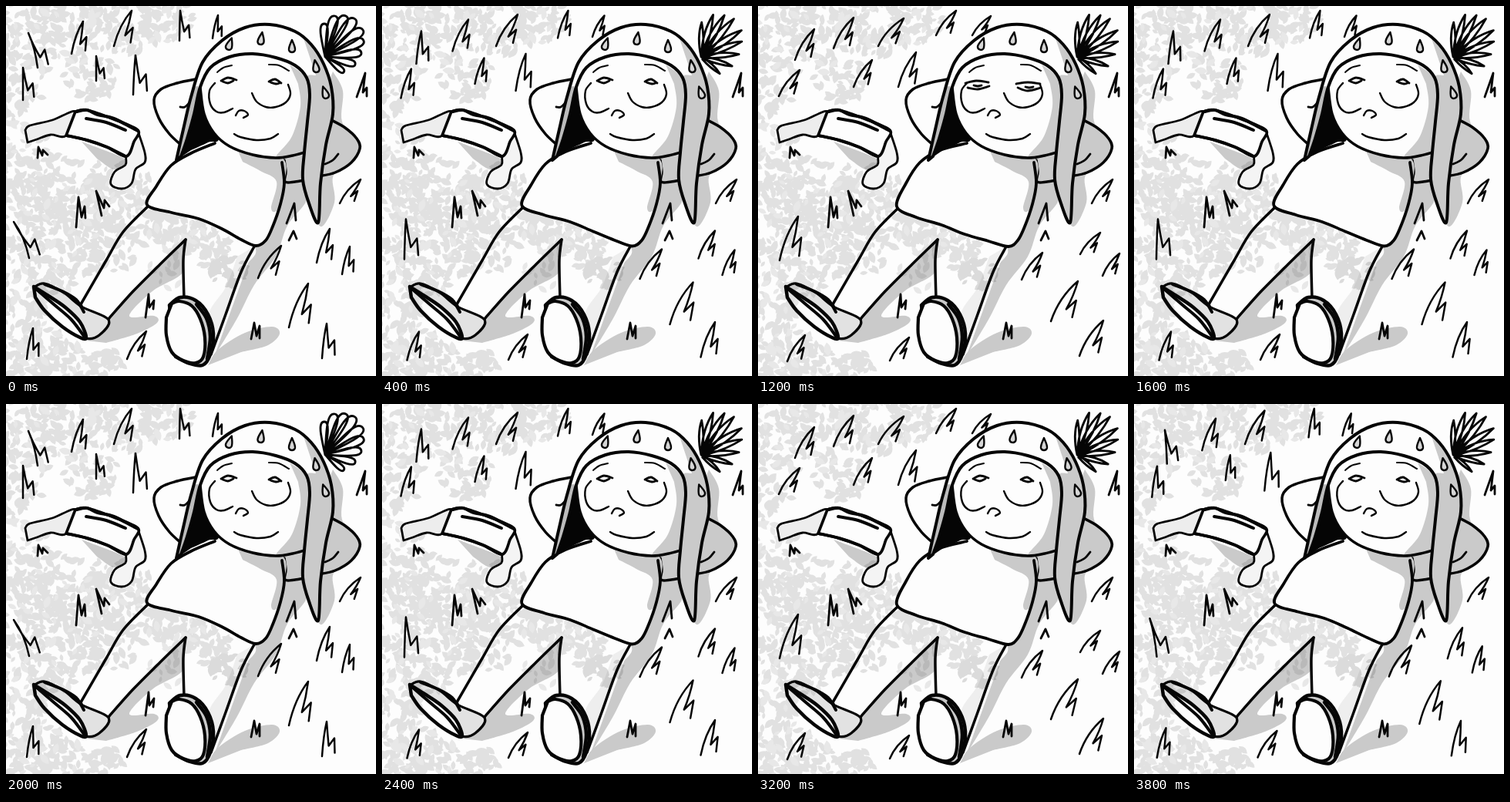
Recreate the animation shown at these times as an HTML page. Size 480 px wide and 480 px high, loop 4 s.

```html
<!DOCTYPE html>
<html lang="en">
<head>
<meta charset="utf-8">
<title>Resting on the grass</title>
<style>
html, body { margin: 0; width: 100%; height: 100%; overflow: hidden; background: #fdfdfd; }
svg { display: block; width: 100%; height: 100%; }
path { stroke-linecap: round; stroke-linejoin: round; }
#leaves { mix-blend-mode: multiply; }
</style>
</head>
<body>
<svg id="stage" viewBox="0 0 480 480"></svg>
<script>
const stage = document.getElementById('stage');
const INK = '#050505', PAPER = '#fdfdfd', SHADE = '#cacaca';

const points = text => text.split(' ').map(p => p.split(',').map(Number));
const mix = (a, b, k) => a + (b - a) * k;
const fix = n => n.toFixed(1);

// Smooth curve through the points; "close" joins the ends with a line.
function curve(list, close) {
  const p = typeof list === 'string' ? points(list) : list;
  let d = 'M' + p[0];
  for (let i = 0; i < p.length - 1; i++) {
    const a = p[i - 1] || p[i], b = p[i], c = p[i + 1], e = p[i + 2] || c;
    d += `C${fix(b[0] + (c[0] - a[0]) / 6)} ${fix(b[1] + (c[1] - a[1]) / 6)} ` +
         `${fix(c[0] - (e[0] - b[0]) / 6)} ${fix(c[1] - (e[1] - b[1]) / 6)} ${c}`;
  }
  return d + (close ? 'Z' : '');
}

function add(d, fill = 'none', width = 0, parent = stage) {
  const el = document.createElementNS('http://www.w3.org/2000/svg', 'path');
  el.setAttribute('d', d);
  el.setAttribute('fill', fill);
  if (width) {
    el.setAttribute('stroke', INK);
    el.setAttribute('stroke-width', width);
  }
  parent.appendChild(el);
  return el;
}
const line = (text, width = 3.5) => add(curve(text), 'none', width);
const area = (text, fill = SHADE, width = 0) => add(curve(text, true), fill, width);

let seed = 11;
const random = () => (seed = (seed * 16807) % 2147483647) / 2147483647;

function leaf(x, y) {
  const a = random() * Math.PI, l = 4 + random() * 5, w = l * 0.6;
  const dx = Math.cos(a), dy = Math.sin(a);
  const at = (u, v) => fix(x + u * dx - v * dy) + ' ' + fix(y + u * dy + v * dx);
  return `M${at(-l, 0)}Q${at(0, -w * 1.7)} ${at(l, 0)}Q${at(0, w * 1.7)} ${at(-l, 0)}`;
}

function foliage(text, density) {
  return text.split(' ').map(item => {
    const [x, y, r] = item.split(',').map(Number);
    let d = '';
    for (let i = 0; i < r * density; i++) {
      const a = random() * 2 * Math.PI, q = r * Math.sqrt(random());
      d += leaf(x + q * Math.cos(a) * 1.15, y + q * Math.sin(a));
    }
    return d;
  }).join('');
}

// Ground shadows
area('424,85 437,110 436,150 456,180 440,206 424,222 426,255 408,286 395,240 400,150');
area('322,312 345,290 362,232 386,228 390,252 365,285 350,325 322,362 300,405 270,455');
area('262,466 275,446 310,424 345,416 355,425 340,440 305,449');
area('104,434 133,406 175,360 229,312 230,345 190,370 160,402 192,402 196,411 170,425 130,437');
area('98,176 150,196 156,205 140,212 118,198');

// Arms
area('246,95 222,100 201,108 192,122 198,145 212,166 228,181 240,150', PAPER);
line('246,95 222,100 201,108 192,122 198,145 212,166 228,181');
line('239,124 232,131 226,131', 2.8);
area('420,147 440,158 455,172 459,185 448,203 427,216 405,221 362,228 358,195 400,170');
line('420,147 440,158 455,172 459,185 448,203 427,216 405,221');
line('361,200 363,215 362,228 375,228 387,226');
line('414,205 424,200 431,192', 2.8);

// Legs and shoes
area('184,260 150,295 130,330 97,387 105,398 133,406 165,370 200,335 233,303 229,340 231,382 262,400 268,440 285,400 305,345 322,312 250,270', PAPER);
area('233,304 229,318 198,340 168,369 190,343');
area('322,312 305,345 285,400 268,445 263,400 285,365 300,325', '#eeeeee');
line('184,260 152,293 130,330 97,387');
line('97,387 105,399 133,406');
line('133,406 165,370 200,335 233,303');
line('233,303 230,330 231,380');
line('322,312 305,345 285,400 266,452');
area('36,365 50,360 75,372 98,390 133,407 121,427 103,431 75,416 50,393', '#e2e2e2', 3.2);
area('36,364 55,376 77,391 96,410 104,430 96,430 73,416 50,395 38,378', PAPER, 4.5);
line('40,368 62,387 84,406 101,428', 4);
line('50,361 73,370 91,381 101,397', 4);
area('212,388 226,378 246,382 262,400 269,425 265,452 255,466 236,463 220,455', SHADE, 4.5);
area('215,386 225,383 241,389 252,406 258,430 256,455 246,463 230,460 215,449 208,427 208,404', PAPER, 4.2);
line('247,387 260,405 265,429 261,458', 4.5);

// Leaf shadows
const leaves = document.createElementNS('http://www.w3.org/2000/svg', 'g');
leaves.id = 'leaves';
stage.appendChild(leaves);
add(foliage('30,15,55 95,15,45 150,20,45 205,15,34 110,90,32 20,60,40 12,120,30 20,205,46 70,235,46 30,275,48 105,270,44 145,235,38 180,275,36 135,312,34 75,325,42 20,345,46 15,410,38 25,465,36 70,460,36 130,465,20 225,290,32 262,315,26', 1.7), '#e3e3e3', 0, leaves);
add(foliage('55,35,60 180,22,40 15,170,25 60,270,60 150,270,48 30,360,45 50,455,45 225,305,32 205,345,24', 0.45), '#eaeaea', 0, leaves);
add(foliage('288,345,20', 1.5), '#dddddd', 0, leaves);

// Bag
area('25,161 31,155 60,148 90,137 78,168 58,167 40,173 28,177', '#ededed', 2.8);
area('172,165 180,190 180,203 168,212 163,230 150,237 136,231 141,215 155,206 156,195 162,175', '#f4f4f4', 2.8);
area('90,137 105,135 140,147 171,161 166,176 156,195 131,183 105,174 78,168', PAPER, 3.6);
line('91,137 105,135 119,141 140,146 171,162', 4.2);
line('79,168 105,174 131,183 155,195', 4);
line('104,146 130,151 155,161', 4);

// Shirt
const SHIRT_IN = points('271,178 240,191 214,207 195,234 183,258 215,268 250,276 280,289 305,303 324,311');
const SHIRT_OUT = points('271,178 236,187 210,203 192,230 180,260 205,274 238,284 268,296 299,305 325,312');
const SHIRT_SIDE = points('337,304 346,286 356,257 361,230 358,203');
const shirtFill = add('', PAPER);
area('300,186 358,197 361,230 352,264 344,262 351,228 330,214 307,202');
const shirtLine = add('', 'none', 3.8);

// Hat tassel, then the head over it
const tassel = add('', PAPER, 2.8);
area('221,200 228,175 236,135 251,98 276,168 262,177 240,187', INK);
const HAT = '221,200 230,160 240,118 255,73 280,45 310,28 342,24 375,33 396,50 412,75 422,105 424,140 415,180 408,230 405,281 393,256 385,225 387,190 391,150 394,115 390,93 375,77 350,67 320,62 290,66 265,80 252,105 244,140 235,172 227,195';
area('252,105 265,80 290,66 320,62 350,67 375,77 390,93 394,115 391,150 387,190 372,194 350,196 320,193 290,182 270,165 257,140', PAPER);
area('368,76 388,92 394,115 391,150 387,190 366,195 350,196 371,169 382,130 379,101');
line('252,106 257,140 270,165 290,182 320,193 350,197 372,194 387,190');
area(HAT, PAPER);
area('386,42 404,62 418,90 424,125 415,180 408,230 405,281 393,256 385,225 387,190 391,150 394,115 390,92 402,90');
area('233,147 244,108 250,109 241,145 229,190 224,194', '#bcbcbc');
area(HAT, 'none', 4);

points('290,50 331,43 371,53 402,79 414,113').forEach(([x, y], i) => {
  const drop = add('M0 -9C2 -4 4.500 0 4 4C3 8 -3 8 -4 4C-4.500 0 -2 -4 0 -9Z', '#d6d6d6', 2.4);
  drop.setAttribute('transform', `translate(${x} ${y}) rotate(${18 - i * 9})`);
});

// Face
line('274,86 282,80 293,77', 2);
line('341,76 354,77 367,84', 2);
line('271,100 264,110 265,127 273,137 283,138 294,133', 2.4);
line('319,113 325,124 337,131 350,131 363,125 369,114 366,102', 2.4);
line('298,142 302,136 309,136 314,141 308,145', 2.4);
line('296,166 304,170 325,174 343,172 353,166', 2.4);

const EYES = {
  open: ['279,97 288,93 299,96', '281,98 288,100 295,97', '341,98 349,95 357,100', '343,99 350,101 355,100'],
  half: ['269,100 283,97 299,99', '272,106 285,108 300,104', '335,101 350,99 366,101', '337,106 350,110 367,106',
         '280,103 285,104 290,103', '347,105 352,106 357,105'],
  shut: ['269,108 284,113 300,107', '335,109 350,113 367,108']
};
const eyes = add('', 'none', 2.8);

// Grass: upright base and tip, then leaning base and tip
const MOVING = `41,80 29,35 48,70 73,30
85,62 100,20 98,55 124,15
140,52 163,6 156,52 189,16
225,45 226,6 231,38 257,6
268,42 275,12 278,38 302,13
117,97 117,65 124,105 148,70
165,115 168,64 182,105 205,60
22,122 22,80 27,117 54,83
30,327 10,280 28,330 52,273
27,458 35,418 38,461 61,427
157,458 182,422 171,460 196,430
403,333 420,289 418,322 444,294
327,353 357,311 342,355 369,320
436,348 446,312 447,350 469,321
367,417 392,360 380,409 415,357
410,457 416,412 417,454 448,408`.split('\n').map(points);
const grass = add('', 'none', 2.5);

function tuft([x, y], [tx, ty]) {
  const dx = tx - x, dy = ty - y, h = Math.hypot(dx, dy);
  const at = (u, w, v) => fix(x + u * dx + w * h) + ' ' + fix(y + v * dy);
  return `M${at(0, 0, 0)}Q${at(0.3, 0, 0.6)} ${at(1, 0, 1)}Q${at(0.75, 0.06, 0.65)} ${at(0.3, 0.15, 0.3)}` +
         `L${at(0.4, 0.3, 0.52)}L${at(0.18, 0.34, 0.1)}`;
}

['41,197 42,183 47,194 48,187 54,193', '91,287 94,248 98,274 102,260 103,275',
 '124,272 117,240 127,262 128,252 134,260', '364,282 374,256 376,278', '367,304 373,292 377,302',
 '455,118 466,87 463,112 468,106 468,117', '181,404 185,374 186,391 192,382 191,393',
 '318,432 322,411 325,428 329,415 329,431'
].forEach(p => add('M' + p, 'none', 2.8));
add(tuft([433, 256], [460, 225]), 'none', 2.5);

const TASSEL_TIPS = points('413,23 427,13 441,13 453,17 463,31 464,45 461,61 453,76 438,86');

function petal([x, y], round) {
  const bx = 414, by = 66, dx = x - bx, dy = y - by;
  const at = (u, v) => fix(bx + u * dx - v * dy) + ' ' + fix(by + u * dy + v * dx);
  return round
    ? `M${at(0, 0)}C${at(0.6, -0.12)} ${at(1, -0.2)} ${at(1, 0)}C${at(1, 0.16)} ${at(0.6, 0.1)} ${at(0.05, 0)}`
    : `M${at(0, 0)}Q${at(0.6, -0.12)} ${at(1.04, 0.04)}Q${at(0.6, 0.12)} ${at(0.1, 0.04)}`;
}

let shown = -1;
function render(time) {
  const step = Math.floor(time / 200) % 20;
  if (step === shown) return;
  shown = step;
  const beat = step % 10;
  const pose = Math.min(beat, 10 - beat);
  const lean = pose / 4;
  const blend = (a, b) => a.map((v, i) => mix(v, b[i], lean));

  grass.setAttribute('d', MOVING.map(m => tuft(blend(m[0], m[2]), blend(m[1], m[3]))).join(''));

  const hem = SHIRT_IN.map((p, i) => blend(p, SHIRT_OUT[i]).map(fix));
  const shirt = curve(hem.map(p => p.map(Number)).concat(SHIRT_SIDE));
  shirtFill.setAttribute('d', shirt + 'Z');
  shirtLine.setAttribute('d', shirt);

  tassel.setAttribute('d', TASSEL_TIPS.map(t => petal(t, pose === 0)).join(''));
  leaves.setAttribute('transform', `translate(${-pose * 0.7} ${pose * 0.8})`);

  const look = step === 5 ? 'shut' : step === 4 || step === 6 ? 'half' : 'open';
  eyes.setAttribute('d', EYES[look].map(p => curve(p)).join(''));
}

const start = performance.now();
function tick() {
  render(performance.now() - start);
  requestAnimationFrame(tick);
}
tick();
</script>
</body>
</html>
```
